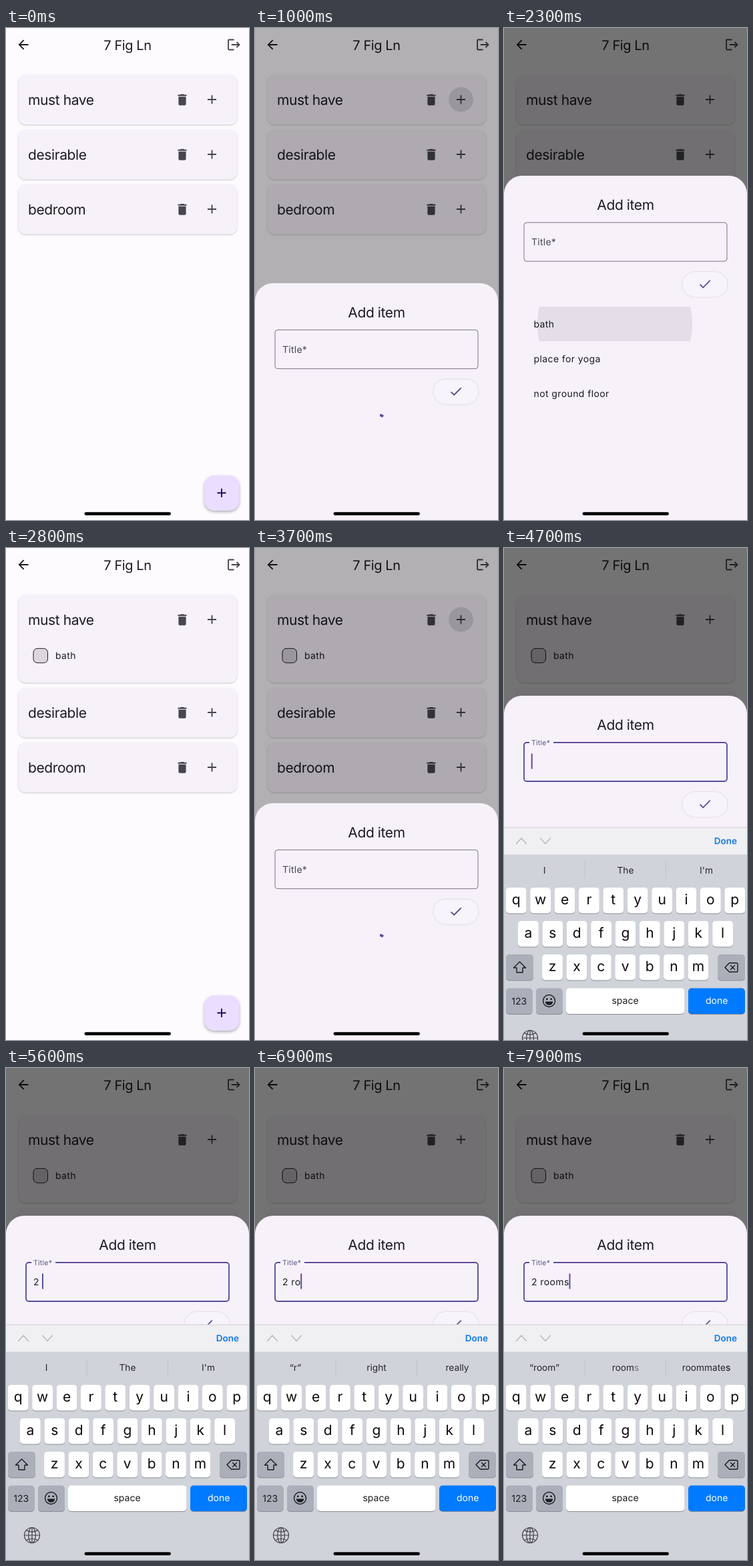
An HTML page for the animation above (8000 ms loop, 364x736 px).

```html
<!DOCTYPE html>
<html lang="en">
<head>
<meta charset="utf-8">
<title>Checklist</title>
<style>
  html, body { margin: 0; width: 100%; height: 100%; overflow: hidden; background: #fdfbfe; }
  svg { display: block; width: 364px; height: 736px; }
  text { font-family: Inter, Roboto, sans-serif; font-size: 14px; fill: #1d1b20; white-space: pre; text-rendering: geometricPrecision; }
  .head { font-size: 21px; letter-spacing: -.4px; }
  .bar { font-size: 20px; letter-spacing: -.4px; }
  .body { letter-spacing: .4px; }
  .mid { text-anchor: middle; }
  .key { font-size: 21px; fill: #0b0b0d; }
  .pop { font-size: 33px; }
  .hint { font-size: 13.7px; fill: #26262a; }
  .card { fill: #f7f2fa; filter: drop-shadow(0 1px 1px rgba(0,0,0,.2)); }
  .line { fill: none; stroke: #1c1c20; stroke-width: 1.4; stroke-linecap: round; stroke-linejoin: round; }
</style>
</head>
<body>
<svg id="stage" viewBox="0 0 364 736" xmlns="http://www.w3.org/2000/svg"></svg>
<script>
const LOOP = 8000, STEP = 100;
const PURPLE = '#5d4d99', GREY = '#79747e';
const icons = {
  bin: 'M6 19c0 1.1.9 2 2 2h8c1.1 0 2-.9 2-2V7H6v12zM19 4h-3.5l-1-1h-5l-1 1H5v2h14V4z',
  add: 'M19 13h-6v6h-2v-6H5v-2h6V5h2v6h6v2z',
  back: 'M20 11H7.83l5.59-5.59L12 4l-8 8 8 8 1.41-1.41L7.83 13H20v-2z',
  exit: 'M17 7l-1.41 1.41L18.17 11H8v2h10.17l-2.58 2.58L17 17l5-5zM4 5h8V3H4c-1.1 0-2 .9-2 2v14c0 1.1.9 2 2 2h8v-2H4V5z',
  check: 'M9 16.17L4.83 12l-1.42 1.41L9 19 21 7l-1.41-1.41z'
};
const icon = (name, x, y, fill) =>
  `<path d="${icons[name]}" fill="${fill}" transform="translate(${x} ${y}) scale(.933) translate(-12 -12)"/>`;
const text = (str, x, y, cls, extra = '') => `<text class="${cls}" x="${x}" y="${y}" ${extra}>${str}</text>`;
const rect = (x, y, w, h, r, fill, extra = '') =>
  `<rect x="${x}" y="${y}" width="${w}" height="${h}" rx="${r}" fill="${fill}" ${extra}/>`;

// Page behind the sheet
const card = (id, label, y, h) => `<g id="${id}" transform="translate(0 ${y})">
  <rect class="card" id="${id}Box" x="18.5" width="327.5" height="${h}" rx="11"/>
  ${text(label, 33, 45, 'head')}${icon('bin', 264, 37.3, '#49454f')}${icon('add', 308.5, 37, '#49454f')}</g>`;

const page = `${rect(0, 0, 364, 736, 0, '#fdfbfe')}
  ${icon('back', 26, 25, '#1d1b20')}${text('7 Fig Ln', 182, 32.5, 'bar mid')}${icon('exit', 341.5, 25, '#49454f')}
  ${card('must', 'must have', 70, 74.5)}${card('want', 'desirable', 152, 74.5)}${card('bed', 'bedroom', 234, 74.5)}
  <g id="bath">${rect(41, 150.3, 21.5, 21.5, 6, '#dcd6dd', 'stroke="#1d1b20"')}${text('bath', 74, 166.3, 'body')}</g>
  <circle id="tap" cx="308.5" cy="107" r="18.5" fill="#1d1b20"/>
  ${rect(297, 669.5, 52.5, 52.5, 15, '#eaddff', 'style="filter:drop-shadow(0 2px 2px rgba(0,0,0,.3))"')}
  ${icon('add', 323, 695.5, '#21005d')}`;

// Sheet, laid out in its raised position
const rows = ['bath', 'place for yoga', 'not ground floor'];
const sheet = `<path d="M0 248a27 27 0 0 1 27-27H337a27 27 0 0 1 27 27V740H0z" fill="#f7f2fa"/>
  ${text('Add item', 182, 272.3, 'head mid')}
  <path id="border" fill="none"/><text id="label" x="41"></text>
  <text id="typed" class="body" x="41" y="324.7"></text><rect id="caret" y="307.5" width="2" height="23" fill="${PURPLE}"/>
  ${rect(267.5, 365, 67, 37, 18.5, '#f8f4fb', 'style="filter:drop-shadow(0 .5px .8px rgba(0,0,0,.18))"')}
  ${icon('check', 301, 383, PURPLE)}
  <g id="list"><circle id="ripple" cx="166" cy="443" fill="#1d1b20" clip-path="url(#row)"/>
  ${rows.map((s, i) => text(s, 44.5, 448 + 52 * i, 'body')).join('')}</g>
  <path id="spin" fill="none" stroke="${PURPLE}" stroke-width="3.8"/>`;

// Keyboard
const keyBox = (x, y, w, fill = '#fff') =>
  rect(x, y + 1, w, 38.5, 4.7, '#8b8d94') + rect(x, y, w, 38.5, 4.7, fill);
const keyRow = (chars, first, y, pitch = 36.4, w = 30.8) => [...chars].map((c, i) => {
  const x = first + pitch * i;
  return keyBox(x - w / 2, y, w) + text(c.replace('&', '&amp;'), x, y + 25.3, 'key mid');
}).join('');
const DARK = '#abafba';
const letters = `<g id="letters">${keyRow('qwertyuiop', 18.2, 474)}${keyRow('asdfghjkl', 36.4, 524)}
  ${keyRow('zxcvbnm', 72.5, 574)}${keyBox(3, 574, 41, DARK)}
  <path class="line" d="M23.5 585l9 9h-4.5v7h-9v-7h-4.500z"/></g>`;
const digits = `<g id="digits">${keyRow('1234567890', 18.2, 474)}${keyRow('-/:;()$&@"', 18.2, 524)}
  ${keyRow(".,?!'", 80, 574, 51, 45)}${keyBox(3, 574, 41, DARK)}${text('#+=', 23.5, 598, 'mid')}</g>`;
const keyboard = `${rect(0, 424, 364, 600, 0, '#d1d3da')}${rect(0, 384, 364, 40.5, 0, '#f0eff2')}
  ${rect(0, 383.5, 364, 1, 0, '#d3d2d7')}
  <path class="line" style="stroke:#b9b9be" d="M18.500 408.500l7.500-8.500 7.500 8.500M54.500 400l7.500 8.500 7.500-8.500"/>
  ${text('Done', 349, 409, '', 'text-anchor="end" style="font-weight:600;font-size:13.5px;fill:#1079e8"')}
  ${rect(120.5, 435.5, 1, 25, 0, '#bfc1c8')}${rect(242, 435.5, 1, 25, 0, '#bfc1c8')}
  <g id="hints">${[60.5, 182, 303].map((x, i) => text('', x, 453, 'hint mid', `id="hint${i}"`)).join('')}
  ${text('s', 339.5, 453, 'hint', 'id="ghost" text-anchor="end" fill-opacity=".6"')}</g>
  ${letters}${digits}
  ${keyBox(320, 574, 41, DARK)}
  <path class="line" d="M331 593.500l6.500-6.800h10.500q2 0 2 2v9.600q0 2-2 2h-10.500zM339.500 590.500l6 6m0-6l-6 6"/>
  ${keyBox(3, 624.5, 39.5, DARK)}<rect id="modeOn" x="3" y="624.5" width="39.5" height="38.5" rx="4.7" fill="#fff"/>
  <text id="mode" class="mid" x="22.7" y="648.5"></text>
  ${keyBox(48, 624.5, 40, DARK)}
  <circle class="line" cx="67.500" cy="643.500" r="9"/><circle cx="64.300" cy="640.700" r="1.300"/><circle cx="70.700" cy="640.700" r="1.300"/>
  <path d="M61.800 644.500h11.400a5.700 5.300 0 0 1-11.400 0z" fill="#1c1c20"/>
  ${keyBox(93, 624.5, 177.5)}${text('space', 181.5, 647.5, 'mid')}
  ${keyBox(276, 624.5, 85, '#007aff')}${text('done', 318.7, 647.5, 'mid', 'style="fill:#fff"')}
  <g class="line" style="stroke:#3f4046;stroke-width:1.2"><circle cx="39" cy="699" r="11.500"/><ellipse cx="39" cy="699" rx="5.300" ry="11.500"/>
  <path d="M27.500 699h23M39 687.500v23M30.500 691.500q8.500 5 17 0M30.500 706.500q8.500-5 17 0"/></g>
  <g id="bubble"><path d="M-15.4 38.500V6C-15.400-3-26-3-26-12V-42q0-9 9-9H17q9 0 9 9V-12C26-3 15.400-3 15.400 6V38.500z" fill="#fff" style="filter:drop-shadow(0 1px 1.5px rgba(0,0,0,.3))"/>
  <text id="bubbleChar" class="key pop mid" y="-15"></text></g>`;

document.getElementById('stage').innerHTML =
  `<defs><clipPath id="row"><rect x="30" y="417" width="304" height="51.5"/></clipPath></defs>
  ${page}<rect id="scrim" width="364" height="736"/>
  <g id="sheet">${sheet}</g><g id="kb">${keyboard}</g>${rect(117.5, 724.3, 129.5, 4.6, 2.3, '#000')}`;

const el = {};
document.querySelectorAll('[id]').forEach(n => el[n.id] = n);
const set = (n, attrs) => { for (const k in attrs) n.setAttribute(k, attrs[k]); };
const show = (n, on) => n.setAttribute('visibility', on ? 'visible' : 'hidden');
const move = (n, x, y) => n.setAttribute('transform', `translate(${x} ${y})`);
const clamp = v => Math.min(1, Math.max(0, v));
const smooth = v => v * v * (3 - 2 * v);
const mix = (a, b, p) => a + (b - a) * p;
const latest = (list, t) => list.filter(e => e[0] <= t).pop();

const typing = [[0, ''], [5500, '2'], [5600, '2 '], [6600, '2 r'], [6900, '2 ro'], [7200, '2 roo'], [7500, '2 room'], [7800, '2 rooms']];
const presses = [[5400, '2', 54.6, 474], [6500, 'r', 127.4, 474], [6800, 'o', 309.4, 474], [7100, 'o', 309.4, 474], [7400, 'm', 290.9, 574], [7700, 's', 72.8, 524]];
const hints = [[0, 'I', 'The', "I'm"], [6700, '“r”', 'right', 'really'], [7000, '“ro”', 'room', 'rooms'],
  [7300, '“roo”', 'room', 'rooms'], [7600, '“room”', 'rooms', 'roommates']];
const carets = [[4400, 1], [4900, .6], [5000, .2], [5100, 0], [5300, .6], [5400, 1], [6100, .6], [6200, .2], [6300, 0], [6600, 1]];

function drawPage(t) {
  const grown = t >= 2700, shift = grown ? 57 : 0;
  el.mustBox.setAttribute('height', 74.5 + shift);
  move(el.want, 0, 152 + shift);
  move(el.bed, 0, 234 + shift);
  show(el.bath, grown);
}

function drawSheet(t) {
  const k = t - (t >= 3700 ? 3700 : 1000);
  const shut = t < 3700 ? clamp((t - 2400) / 300) : 0;
  const up = k >= 0 && shut < 1;
  const drop = 515 * Math.max(Math.pow(1 - clamp((k + 110) / 300), 2.55), shut * shut);
  const dim = up ? .54 * smooth(clamp((k + 160) / 300)) * (1 - shut) : 0;
  set(el.scrim, { 'fill-opacity': dim });
  set(el.tap, { 'fill-opacity': k >= 0 ? .13 * clamp(1 - k / 300) : 0 });
  show(el.sheet, up);
  move(el.sheet, 0, drop);

  // Short arc that grows while the rows load
  const loading = up && k < 200, a0 = .3 + k * .004, a1 = a0 + .3 + k * .012;
  const pt = a => `${182 + 17.6 * Math.sin(a)} ${435 - 17.6 * Math.cos(a)}`;
  el.spin.setAttribute('d', `M${pt(a0)}A17.6 17.6 0 0 1 ${pt(a1)}`);
  el.spin.setAttribute('display', loading ? 'inline' : 'none');
  el.list.setAttribute('display', loading ? 'none' : 'inline');
  const r = t - 2300, on = r >= 0 && t < 2700;
  set(el.ripple, { r: on ? 116 + r * .6 : 0, 'fill-opacity': on ? .09 * (1 - r / 400) : 0 });
}

function drawField(t) {
  const p = t < 4400 ? 0 : smooth(clamp((t - 4365) / 180));
  const lit = t >= 4500, gap = 38 + 36 * p, x = p ? `M${gap} 291` : 'M38 291';
  set(el.border, {
    d: `${x}H330a4 4 0 0 1 4 4V345a4 4 0 0 1-4 4H34a4 4 0 0 1-4-4V295a4 4 0 0 1 4-4H38`,
    stroke: lit ? PURPLE : GREY, 'stroke-width': lit ? 1.87 : 1
  });
  el.label.textContent = 'Title*';
  el.label.style.cssText = `font-size:${mix(14, 10.5, p)}px;letter-spacing:.25px;fill:${lit ? '#5c5383' : '#49454f'}`;
  el.label.setAttribute('y', mix(325.3, 295.2, p));
  el.typed.textContent = latest(typing, t)[1].replace(' ', '\u00a0');
  const c = latest(carets, t);
  set(el.caret, { x: 41 + el.typed.getComputedTextLength() - .3, 'fill-opacity': c ? c[1] : 0 });
}

function drawKeyboard(t) {
  show(el.kb, t >= 4400);
  el.kb.setAttribute('display', t >= 4400 ? 'inline' : 'none');
  move(el.kb, 0, 272 * Math.pow(1 - clamp((t - 4400) / 600), 3));
  const numeric = t >= 5400 && t < 5600;
  el.letters.setAttribute('display', numeric ? 'none' : 'inline');
  el.digits.setAttribute('display', numeric ? 'inline' : 'none');
  el.mode.textContent = numeric ? 'ABC' : '123';
  el.modeOn.setAttribute('display', t === 5300 ? 'inline' : 'none');
  el.hints.setAttribute('display', t >= 4600 ? 'inline' : 'none');
  latest(hints, t).slice(1).forEach((s, i) => el['hint' + i].textContent = s);
  const fading = t >= 7900;
  el.ghost.setAttribute('display', fading ? 'inline' : 'none');
  if (fading) el.hint1.innerHTML = 'room<tspan fill-opacity=".55">s</tspan>';
  const press = presses.find(e => e[0] === t);
  el.bubble.setAttribute('display', press ? 'inline' : 'none');
  if (press) {
    el.bubbleChar.textContent = press[1];
    move(el.bubble, press[2], press[3]);
  }
}

function draw(ms) {
  const t = Math.floor((ms % LOOP) / STEP + 1e-6) * STEP;
  drawPage(t);
  drawSheet(t);
  drawField(t);
  drawKeyboard(t);
}

function tick() {
  draw(performance.now());
  requestAnimationFrame(tick);
}
tick();
</script>
</body>
</html>
```
